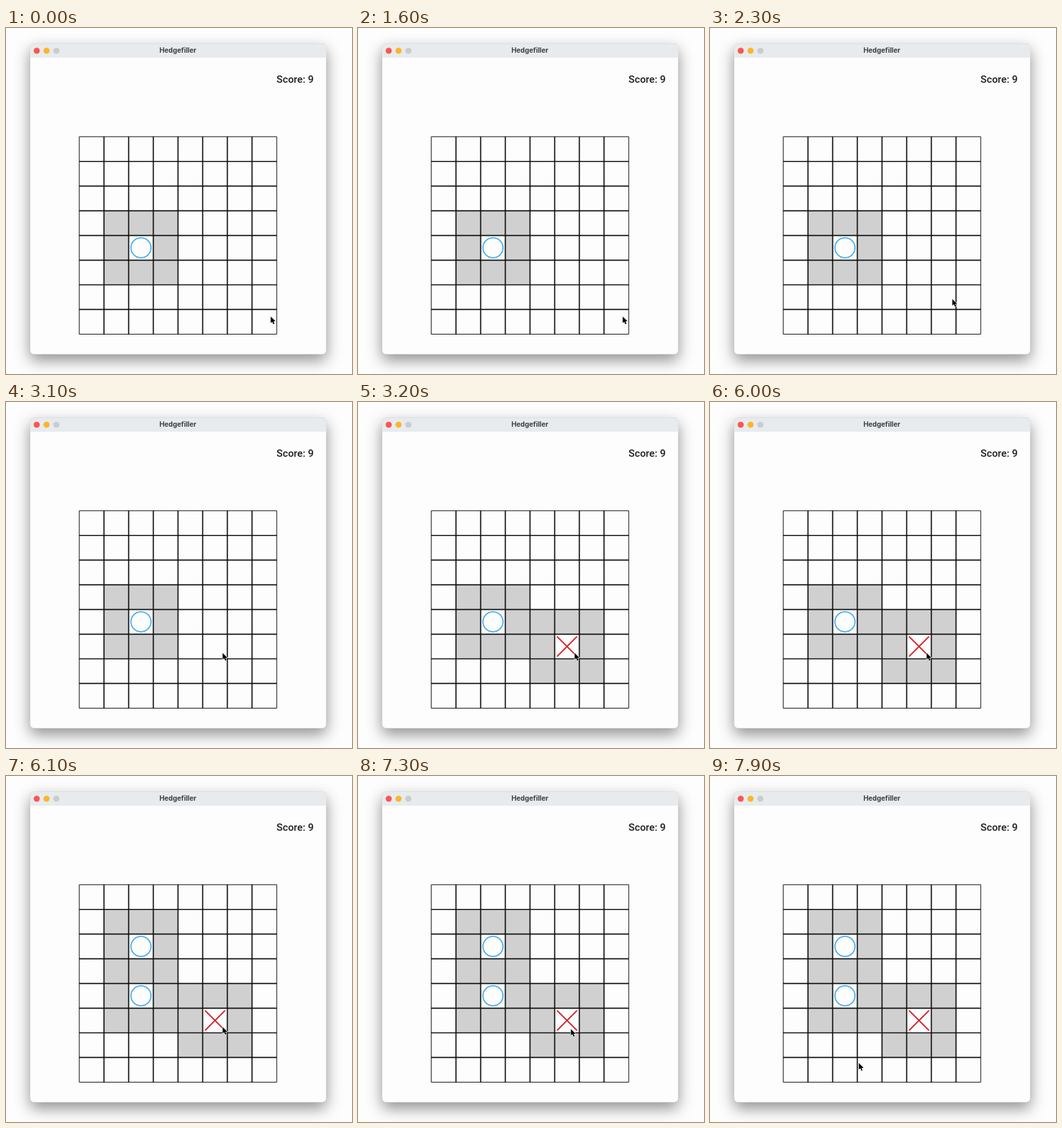
An HTML page that plays this animation: 518x518 px, repeating every 8000 ms.

```html
<!DOCTYPE html>
<html lang="en">
<head>
<meta charset="utf-8">
<title>Hedgefiller</title>
<style>
  html, body { margin: 0; width: 100%; height: 100%; overflow: hidden; background: #fdfdfd; }
  svg { display: block; width: 518px; height: 518px; }
  .window { fill: #fdfdfd; stroke: #c4c6c7; stroke-width: .6;
    filter: drop-shadow(0 9px 11px rgba(0, 0, 0, .42)); }
  .title { font: 700 10.2px Inter, sans-serif; fill: #3c3e40; text-anchor: middle; }
  .score { font: 500 15.2px Roboto, sans-serif; fill: #1c1c1c; }
  .blocked { fill: #d0d0d0; }
  .free { fill: #fdfdfd; }
  .grid { stroke: #0c0c0c; fill: none; }
  .circle { fill: none; stroke: #45aeee; stroke-width: 1.8; }
  .cross { stroke: #d0262c; stroke-width: 1.9; }
  .cursor { stroke: #fff; stroke-width: 1.3; paint-order: stroke; stroke-linejoin: round; }
</style>
</head>
<body>
<svg viewBox="0 0 518 518">
  <rect class="window" x="36" y="23.5" width="443.5" height="465" rx="6"/>
  <path d="M36 44.5V29.5a6 6 0 0 1 6-6H473.5a6 6 0 0 1 6 6V44.5Z" fill="#e7ebed"/>
  <circle cx="46" cy="34" r="4.6" fill="#fb5650"/>
  <circle cx="60.7" cy="34" r="4.6" fill="#fbb52d"/>
  <circle cx="75.4" cy="34" r="4.6" fill="#c9cdcd"/>
  <text class="title" x="257.3" y="37.4">Hedgefiller</text>
  <text class="score" x="405" y="82">Score: 9</text>
  <g id="moves"></g>
  <g id="grid" class="grid"></g>
  <path id="cursor" class="cursor" d="M0 0V9.8L2.3 7.8L3.9 11.4L5.7 10.6L4.1 7.1H7.2Z"/>
</svg>
<script>
const LOOP = 8000, STEP = 100;
const LEFT = 109.7, TOP = 162.8, CELL = 36.95, COUNT = 8;
const byId = id => document.getElementById(id);

const moves = [
  { at: 0, col: 2, row: 4, mark: "circle" },
  { at: 3200, col: 5, row: 5, mark: "cross" },
  { at: 6100, col: 2, row: 2, mark: "circle" }
];

const square = (col, row, span, name) =>
  `<rect class="${name}" x="${LEFT + col * CELL}" y="${TOP + row * CELL}" width="${span * CELL}" height="${span * CELL}"/>`;

const shapes = {
  circle: '<circle class="circle" r="15"/>',
  cross: '<path class="cross" d="M-15 -15L15 15M15 -15L-15 15"/>'
};

function moveMarkup({ col, row, mark }) {
  const x = LEFT + (col + .5) * CELL, y = TOP + (row + .5) * CELL;
  return `<g>${square(col - 1, row - 1, 3, "blocked")}${square(col, row, 1, "free")}
    <g transform="translate(${x} ${y})">${shapes[mark]}</g></g>`;
}

function gridMarkup() {
  const size = COUNT * CELL;
  let lines = "";
  for (let i = 0; i <= COUNT; i++) {
    const width = i % COUNT ? 1.7 : 1;
    lines += `<path stroke-width="${width}" d="M${LEFT + i * CELL} ${TOP}v${size}M${LEFT} ${TOP + i * CELL}h${size}"/>`;
  }
  return lines;
}

byId("moves").innerHTML = moves.map(moveMarkup).join("");
byId("grid").innerHTML = gridMarkup();
const groups = [...byId("moves").children];

const progress = (t, from, to) => Math.min(1, Math.max(0, (t - from) / (to - from)));
const smooth = p => p * p * (3 - 2 * p);
const quickStart = p => smooth(1 - (1 - p) ** 1.6);

function render(now) {
  const t = Math.floor(now % LOOP / STEP) * STEP;
  const a = quickStart(progress(t, 2000, 2900));
  const b = smooth(progress(t, 7200, 7900));
  const x = 396.3 - 72 * a - 101.5 * b;
  const y = 432 - 56.2 * a + 54 * b;
  byId("cursor").setAttribute("transform", `translate(${x} ${y})`);
  groups.forEach((group, i) => group.style.display = t >= moves[i].at ? "" : "none");
}

const start = performance.now();
function tick() {
  render(performance.now() - start);
  requestAnimationFrame(tick);
}
tick();
</script>
</body>
</html>
```
